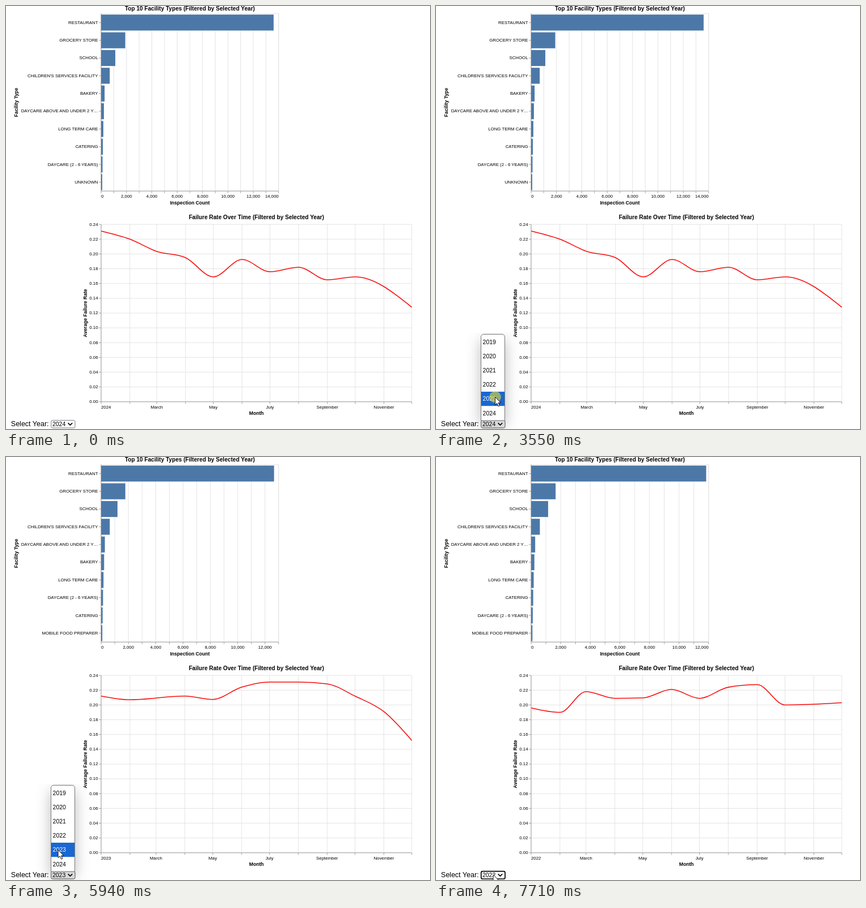
Animation of 749x748 px, one loop 7.99 s. Source, as an HTML page:

```html
<!DOCTYPE html>
<html lang="en">
<head>
<meta charset="utf-8">
<title>Facility inspections</title>
<style>
html, body { margin: 0; width: 100%; height: 100%; overflow: hidden; background: #fff; }
svg { display: block; width: 749px; height: 748px; font-family: Arial, "Liberation Sans", sans-serif; }
.label { font-size: 10px; }
.axis { font-size: 11px; font-weight: bold; }
.title { font-size: 12.9px; font-weight: bold; }
.grid { stroke: #ddd; fill: none; }
.tick { stroke: #888; fill: none; }
.option { font-size: 10.44px; }
.shadow { filter: drop-shadow(0 10px 13px rgba(0, 0, 0, .28)); }
</style>
</head>
<body>
<svg id="stage" viewBox="0 0 749 748"></svg>
<script>
const LOOP = 7990, SCALE = 0.784, SIZE = 400, WIDE = 700;
const LAST_YEAR = 2024, YEAR_COUNT = 6;
const ROW_TOP = 581.4, ROW_H = 25.16;

const MAIN = ['RESTAURANT', 'GROCERY STORE', 'SCHOOL', "CHILDREN'S SERVICES FACILITY"];
const BAKE = 'BAKERY', DAY = 'DAYCARE ABOVE AND UNDER 2 Y…', CARE = 'LONG TERM CARE',
  CATER = 'CATERING', KIDS = 'DAYCARE (2 - 6 YEARS)', MOBILE = 'MOBILE FOOD PREPARER';

// Monthly failure rates in percent; the curve bridges the gaps.
const DATA = {
  2024: {
    top: 13605, school: 1120, minor: [BAKE, DAY, CARE, CATER, KIDS, 'UNKNOWN'],
    rates: [23.1, 22, 20.35, 19.5, 16.9, 19.25, 17.6, 18.2, 16.5, 16.9, , 12.8]
  },
  2023: {
    top: 12665, school: 1200, minor: [DAY, BAKE, CARE, KIDS, CATER, MOBILE],
    rates: [21.2, 20.7, , 21.2, 20.75, 22.4, 23.1, 23.1, 22.85, 21.2, 19.1, 15.2]
  },
  2022: {
    top: 11835, school: 1150, minor: [DAY, BAKE, CARE, CATER, KIDS, MOBILE],
    rates: [19.6, 19, 21.8, 20.9, 20.95, 22.1, 20.9, 22.4, 22.75, 20, , 20.3]
  }
};

const stage = document.getElementById('stage');

function el(parent, tag, attrs = {}, text) {
  const node = document.createElementNS(stage.namespaceURI, tag);
  for (const k in attrs) node.setAttribute(k, attrs[k]);
  if (text !== undefined) node.textContent = text;
  parent.appendChild(node);
  return node;
}
const line = (g, cls, x1, y1, x2, y2) => el(g, 'line', { class: cls, x1, y1, x2, y2 });
const label = (g, cls, x, y, text, anchor = 'middle') =>
  el(g, 'text', { class: cls, x, y, 'text-anchor': anchor }, text);
const sideTitle = (g, x, text) =>
  el(g, 'text', { class: 'axis', transform: `translate(${x} 200) rotate(-90)`, 'text-anchor': 'middle' }, text);
const plot = (g, x, y) => el(g, 'g', { transform: `translate(${x} ${y}) scale(${SCALE})` });

function xTick(g, x, text, anchor) {
  line(g, 'grid', x, 0, x, SIZE);
  line(g, 'tick', x, SIZE, x, SIZE + 5);
  if (text) label(g, 'label', x, SIZE + 15, text, anchor);
}
function yTick(g, y, text) {
  line(g, 'tick', -5, y, 0, y);
  label(g, 'label', -7, y + 3, text, 'end');
}
function finish(g, width, title, titleY, xTitle) {
  el(g, 'path', { class: 'tick', d: `M0,0V${SIZE}H${width}` });
  label(g, 'title', width / 2, titleY, title);
  label(g, 'axis', width / 2, 430, xTitle);
}

// Monotone cubic through points with increasing x.
function monotone(pts) {
  const n = pts.length - 1, h = [], s = [], m = [];
  for (let i = 0; i < n; i++) {
    h[i] = pts[i + 1][0] - pts[i][0];
    s[i] = (pts[i + 1][1] - pts[i][1]) / h[i];
  }
  for (let i = 1; i < n; i++) {
    const p = (s[i - 1] * h[i] + s[i] * h[i - 1]) / (h[i - 1] + h[i]);
    m[i] = (Math.sign(s[i - 1]) + Math.sign(s[i])) *
      Math.min(Math.abs(s[i - 1]), Math.abs(s[i]), Math.abs(p) / 2);
  }
  m[0] = (3 * s[0] - m[1]) / 2;
  m[n] = (3 * s[n - 1] - m[n - 1]) / 2;
  let d = `M${pts[0]}`;
  for (let i = 0; i < n; i++) {
    const [x0, y0] = pts[i], [x1, y1] = pts[i + 1], k = h[i] / 3;
    d += `C${x0 + k},${y0 + k * m[i]} ${x1 - k},${y1 - k * m[i + 1]} ${x1},${y1}`;
  }
  return d;
}

function barChart(parent, { top, school, minor }) {
  const g = plot(parent, 168, 13.6);
  const max = Math.ceil(top / 1000) * 1000;
  const counts = [top, top * .14, school, top * .05, ...minor.map((_, i) => 275 * .8 ** i)];
  for (let v = 0; v <= max; v += 1000) {
    const text = v % 2000 ? '' : v.toLocaleString('en-US');
    xTick(g, v / max * SIZE, text, v === 0 ? 'start' : v === max ? 'end' : 'middle');
  }
  el(g, 'rect', { class: 'grid', width: SIZE, height: SIZE });
  [...MAIN, ...minor].forEach((name, i) => {
    const y = i * 40 + 20;
    yTick(g, y, name);
    el(g, 'rect', { y: y - 18, width: counts[i] / max * SIZE, height: 36, fill: '#4c78a8' });
  });
  finish(g, SIZE, 'Top 10 Facility Types (Filtered by Selected Year)', -7, 'Inspection Count');
  sideTitle(g, -188, 'Facility Type');
}

function lineChart(parent, year, { rates }) {
  const g = plot(parent, 168, 386.2);
  const days = i => Date.UTC(year, i) - Date.UTC(year, 0);
  const monthX = i => days(i) / days(11) * WIDE;
  const pts = [];
  rates.forEach((r, i) => pts.push([monthX(i), SIZE * (1 - r / 24)]));
  for (let i = 0; i < 12; i++) {
    const name = new Date(year, i).toLocaleString('en-US', { month: 'long' });
    xTick(g, monthX(i), i === 0 ? year : i % 2 ? '' : name, i ? 'middle' : 'start');
  }
  for (let i = 0; i <= 12; i++) {
    const y = SIZE * (1 - i / 12);
    line(g, 'grid', 0, y, WIDE, y);
    yTick(g, y, (i * .02).toFixed(2));
  }
  el(g, 'path', { d: monotone(pts), fill: 'none', stroke: '#f90c0c', 'stroke-width': 2 });
  finish(g, WIDE, 'Failure Rate Over Time (Filtered by Selected Year)', -11.5, 'Month');
  sideTitle(g, -32, 'Average Failure Rate');
}

const charts = {};
for (const year in DATA) {
  charts[year] = el(stage, 'g');
  barChart(charts[year], DATA[year]);
  lineChart(charts[year], +year, DATA[year]);
}

// Year picker
el(el(stage, 'clipPath', { id: 'popArea' }), 'rect', { x: 40, y: 578, width: 120, height: 170 });
const shade = el(stage, 'g', { 'clip-path': 'url(#popArea)' });
el(shade, 'rect', { class: 'shadow', x: 79.5, y: 580.5, width: 42, height: 152.5, rx: 4, fill: '#fff' });
el(stage, 'text', { x: 8.8, y: 743, 'font-size': 12.53 }, 'Select Year:');
const box = el(stage, 'rect', { x: 79.7, y: 732.7, width: 42.3, height: 13.3, rx: 2.5 });
const value = el(stage, 'text', { class: 'option', x: 82, y: 743 });
el(stage, 'path', { d: 'M109.6,737.4L113.4,741L117.2,737.4', fill: 'none', stroke: '#000', 'stroke-width': 1.7 });

const popup = el(stage, 'g');
el(popup, 'path', { d: 'M79.5,733V585a4.5,4.5 0 0 1 4.5,-4.5H117a4.5,4.5 0 0 1 4.5,4.5V733Z', fill: '#fff', stroke: '#777' });
const bar = el(popup, 'rect', { x: 80, width: 41, height: ROW_H, fill: '#1967d2' });
const options = Array.from({ length: YEAR_COUNT }, (_, i) =>
  el(popup, 'text', { class: 'option', x: 82.6, y: ROW_TOP + (i + .5) * ROW_H + 3.8 }, LAST_YEAR - YEAR_COUNT + 1 + i));

const ring = el(stage, 'circle', { r: 10.3, fill: 'rgba(235,220,50,.6)' });
const cursor = el(stage, 'path', {
  d: 'M0,0V14L3.2,11L5.6,16.4L7.9,15.4L5.6,10.2H10Z',
  fill: '#fff', stroke: '#000', 'stroke-width': .9, 'stroke-linejoin': 'round'
});

// Pointer moves: start, end, x, y. It enters from below the picker.
const ENTRY = [126, 750], STEP = 70;
const MOVES = [
  [1450, 1800, 113.5, 738.5],
  [2800, 3220, 104.5, 691.5],
  [4140, 4670, 103.5, 736],
  [5470, 5680, 97, 716],
  [5940, 6150, 93.5, 667.5],
  [7170, 7710, 101, 738.5]
];
// Clicks in turn open the list and pick the year before.
const CLICKS = [[2150, 2400], [3550, 3770], [4940, 5210], [6560, 6840]];
const OPEN_DELAY = 70, CHART_DELAY = 40;

const show = (node, on) => node.setAttribute('visibility', on ? 'visible' : 'hidden');
const picks = t => CLICKS.filter((c, i) => i % 2 && t >= c[1]).length;
const isOpen = t => CLICKS.some((c, i) => i % 2 === 0 && t >= c[0] + OPEN_DELAY && t < CLICKS[i + 1][1]);

function pointer(t) {
  const n = MOVES.filter(m => t >= m[0]).length;
  if (!n) return null;
  const [start, end, x, y] = MOVES[n - 1];
  const [x0, y0] = n > 1 ? MOVES[n - 2].slice(2) : ENTRY;
  const steps = Math.round((end - start) / STEP) + 1;
  const p = Math.min(1, (Math.floor((t - start) / (end - start) * (steps - 1) + 1e-6) + 1) / steps);
  const e = 1 - (1 - p) ** 2;
  return [x0 + (x - x0) * e - 3.5 * Math.sin(Math.PI * e), y0 + (y - y0) * e];
}

function draw(t) {
  const pos = pointer(t), open = isOpen(t);
  const year = LAST_YEAR - picks(t), shown = LAST_YEAR - picks(t - CHART_DELAY);
  for (const y in charts) show(charts[y], +y === shown);

  show(popup, open);
  show(shade, open);
  if (open) {
    const hover = Math.floor((pos[1] - ROW_TOP) / ROW_H);
    const row = hover < YEAR_COUNT ? hover : YEAR_COUNT - 1 - picks(t);
    bar.setAttribute('y', ROW_TOP + row * ROW_H);
    options.forEach((o, i) => o.setAttribute('fill', i === row ? '#fff' : '#000'));
  }

  const focus = !open && year < LAST_YEAR;
  value.textContent = year;
  box.setAttribute('fill', open ? '#d9d9d9' : '#fff');
  box.setAttribute('stroke', focus ? '#000' : open || pos ? '#505050' : '#767676');
  box.setAttribute('stroke-width', focus ? 1.7 : 1);

  show(cursor, pos);
  show(ring, CLICKS.some(([a, b]) => t >= a && t < b));
  if (pos) {
    cursor.setAttribute('transform', `translate(${pos})`);
    ring.setAttribute('cx', pos[0]);
    ring.setAttribute('cy', pos[1]);
  }
}

const start = performance.now();
function tick() {
  draw((performance.now() - start) % LOOP);
  requestAnimationFrame(tick);
}
tick();
</script>
</body>
</html>
```
